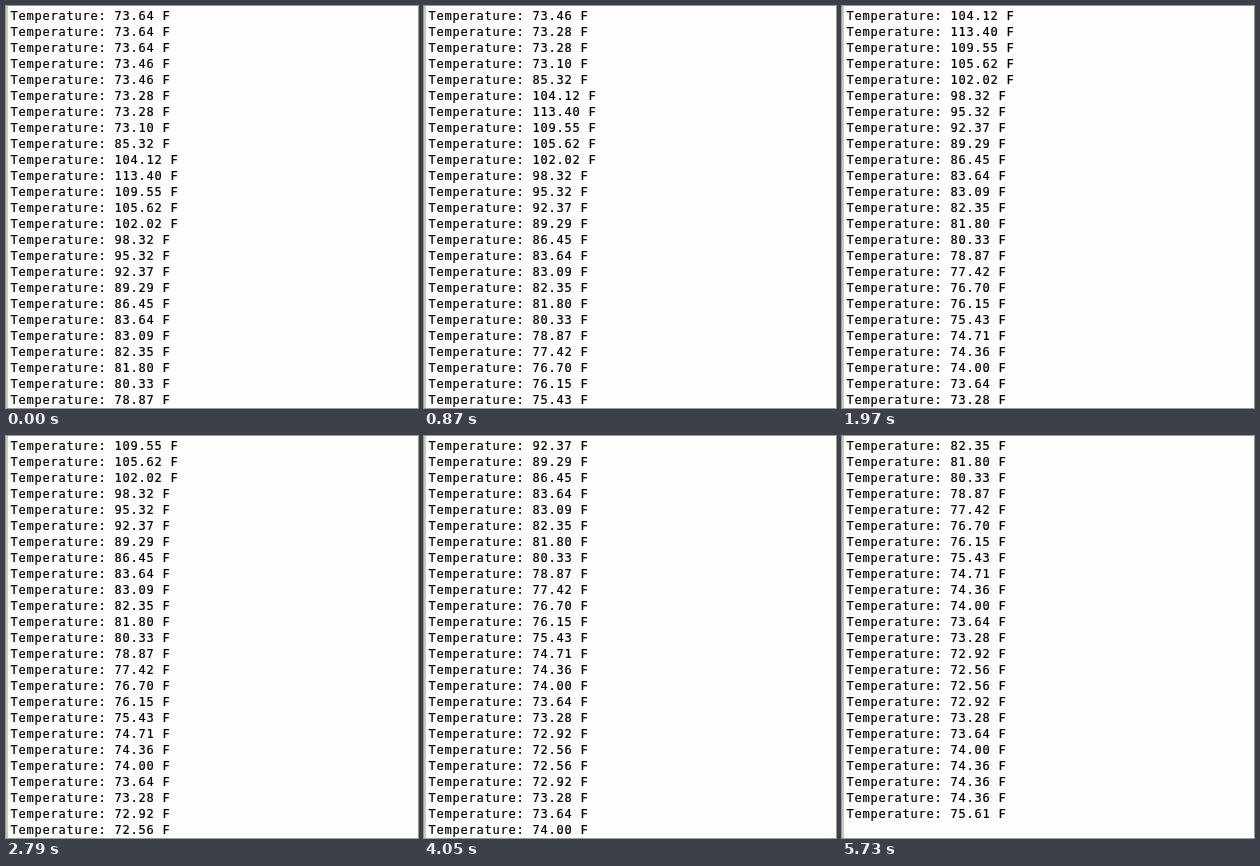
An HTML page for the animation above (5930 ms loop, 412 by 402 pixels).

```html
<!DOCTYPE html>
<html lang="en">
<head>
<meta charset="utf-8">
<title>Temperature log</title>
<style>
  html, body { margin: 0; width: 100%; height: 100%; overflow: hidden; background: #fefefc; }
  svg { display: block; width: 100vw; height: 100vh; }
  text {
    font: 12px "DejaVu Sans Mono", monospace;
    letter-spacing: .776px;
    fill: #000;
    stroke: #000;
    stroke-width: .2px;
  }
</style>
</head>
<body>
<svg id="stage" viewBox="0 0 412 402">
  <rect width="412" height="402" fill="#fefefc"/>
  <rect width="2" height="402" fill="#cbcbb4"/>
</svg>
<script>
const LOOP = 5930, ROWS = 25, PITCH = 16, BASELINE = 14, READINGS = 45;

// Sensor level per reading: idle, heated, cooling down, warming again
const heat = [
  [0, 6], [2, 6], [7, 3], [8, 70], [9, 165], [10, 207], [14, 137], [19, 61],
  [22, 51], [25, 27], [29, 12], [35, 0], [36, 0], [41, 10], [43, 10], [44, 17]
];

// Time in ms against lines scrolled
const pace = [
  [0, 0], [870, 4], [1970, 9], [2790, 11], [3670, 16],
  [4050, 16], [4510, 18], [5170, 19], [5730, 21]
];

// Straight lines between key points, rounded to whole steps
function stepAt(points, x) {
  const i = points.findIndex(p => p[0] >= x);
  if (i < 0) return points[points.length - 1][1];
  if (i === 0) return points[0][1];
  const [x0, y0] = points[i - 1], [x1, y1] = points[i];
  return Math.round(y0 + (y1 - y0) * (x - x0) / (x1 - x0));
}

// Thermistor on a 10-bit converter, in degrees Fahrenheit
const ADC = 1024, IDLE = 472.5, BETA = 3460, IDLE_F = 72.5648;
const logit = n => Math.log(n / (ADC - n));
function fahrenheit(level) {
  const idleK = (IDLE_F - 32) / 1.8 + 273.15;
  const kelvin = 1 / (1 / idleK - (logit(IDLE + level) - logit(IDLE)) / BETA);
  return (kelvin - 273.15) * 1.8 + 32;
}

const log = Array.from({ length: READINGS }, (_, i) =>
  `Temperature: ${fahrenheit(stepAt(heat, i)).toFixed(2)} F`);

const stage = document.getElementById("stage");
const rows = Array.from({ length: ROWS }, (_, i) => {
  const row = document.createElementNS("http://www.w3.org/2000/svg", "text");
  row.setAttribute("x", 4.4);
  row.setAttribute("y", BASELINE + i * PITCH);
  return stage.appendChild(row);
});

let shown = -1;
function draw(t) {
  const first = stepAt(pace, t);
  if (first === shown) return;
  shown = first;
  rows.forEach((row, i) => { row.textContent = log[first + i] || ""; });
}

const start = performance.now();
function tick() {
  draw((performance.now() - start) % LOOP);
  requestAnimationFrame(tick);
}
draw(0);
requestAnimationFrame(tick);
</script>
</body>
</html>
```
